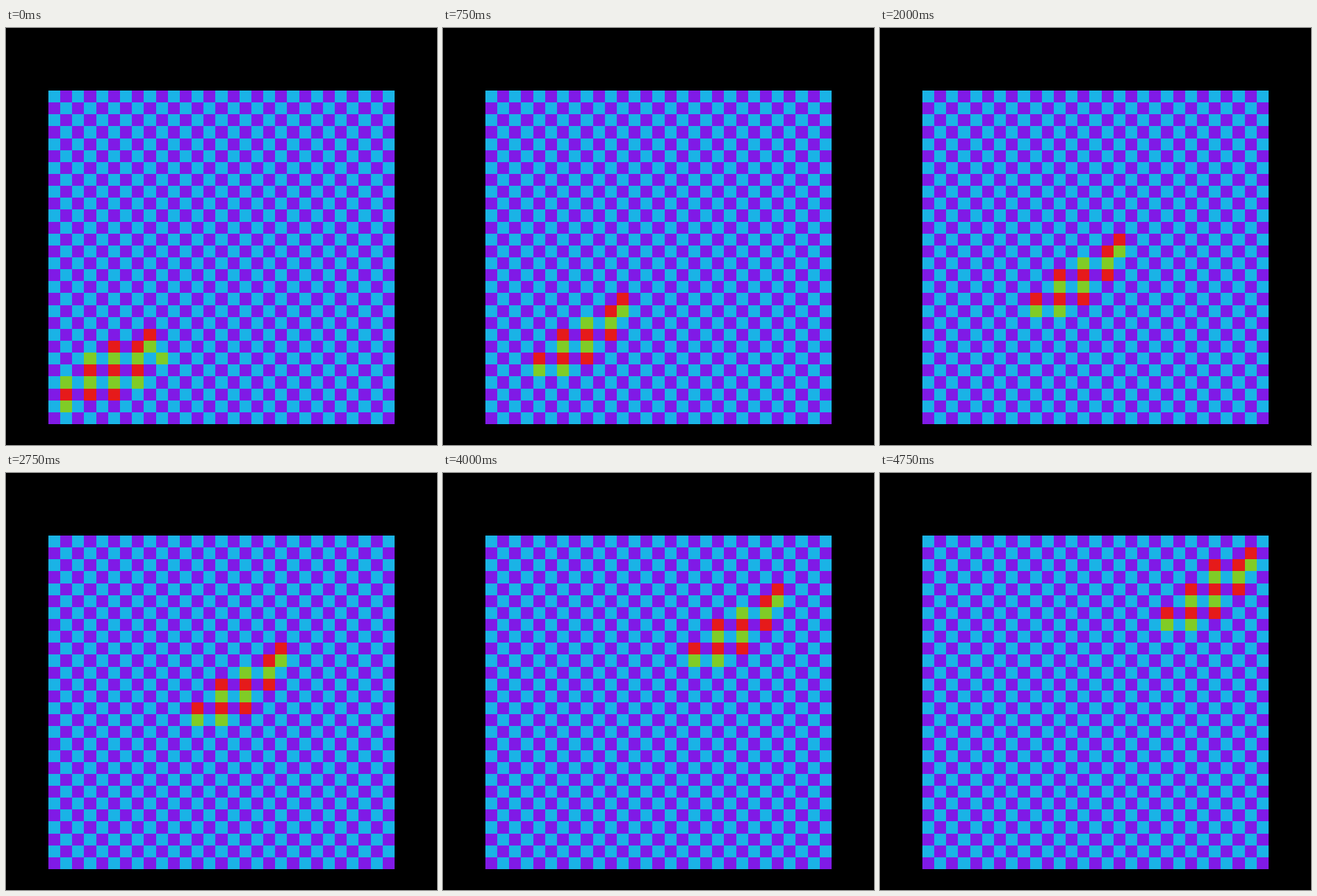
Animation of 620 by 600 pixels, one loop 5 s. Source, as an HTML page with a canvas:

```html
<!DOCTYPE html>
<html lang="en">
<head>
<meta charset="utf-8">
<title>Checkerboard glider</title>
<style>
  html, body { margin: 0; width: 100%; height: 100%; overflow: hidden; background: #000; }
  canvas { display: block; }
</style>
</head>
<body>
<canvas id="stage" width="620" height="600"></canvas>
<script>
const ctx = document.getElementById('stage').getContext('2d');
const COLS = 29, ROWS = 28, STEPS = 20, STEP_MS = 250;
const BOARD = ['#1ab3e6', '#801ae6'];
const GLIDER = ['#e61a1a', '#80cc26'];

// Shapes at their starting place: left column 1, top row 20.
const LEFT = 1, TOP = 20;
const START = [
  '.......#.',
  '....#.##.',
  '..#.#.#.#',
  '..#.#.#..',
  '#.#.#.#..',
  '#.#.#....',
  '#........'
];
const CRUISE = [
  '.......#',
  '......##',
  '....#.#.',
  '..#.#.#.',
  '..#.#...',
  '#.#.#...',
  '#.#.....'
];
const FINISH = CRUISE.map((line, i) => i === 1 ? '....#.##' : line);

const edgeX = col => Math.round(60.98 + 17.17 * col);
const edgeY = row => Math.round(90 + 120 / 7 * row);

function fillCell(col, row, colors) {
  const x = edgeX(col), y = edgeY(row);
  ctx.fillStyle = colors[(col + row) % 2];
  ctx.fillRect(x, y, edgeX(col + 1) - x, edgeY(row + 1) - y);
}

function draw(step) {
  ctx.fillStyle = '#000';
  ctx.fillRect(0, 0, 620, 600);
  for (let row = 0; row < ROWS; row++)
    for (let col = 0; col < COLS; col++) fillCell(col, row, BOARD);

  const shape = step === 0 ? START : step === STEPS - 1 ? FINISH : CRUISE;
  shape.forEach((line, row) => [...line].forEach((mark, col) => {
    if (mark === '#') fillCell(LEFT + step + col, TOP - step + row, GLIDER);
  }));
}

let shown = -1;
function tick() {
  const step = Math.floor(performance.now() / STEP_MS) % STEPS;
  if (step !== shown) draw(shown = step);
  requestAnimationFrame(tick);
}
tick();
</script>
</body>
</html>
```
